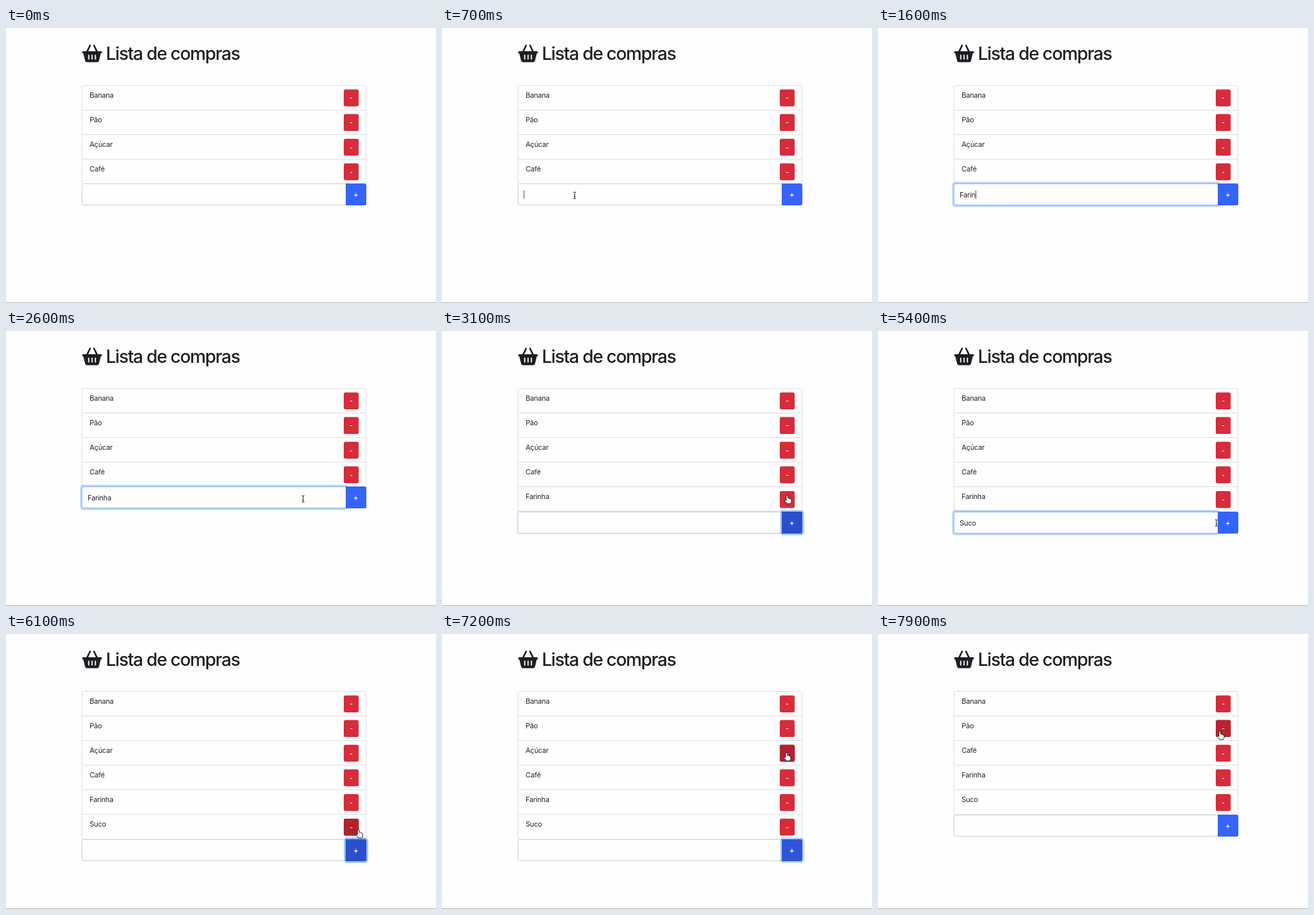
These frames come from a looping animation (648 by 414 pixels, 8 s). An HTML page:

```html
<!DOCTYPE html>
<html lang="pt">
<head>
<meta charset="utf-8">
<title>Lista de compras</title>
<style>
  html, body { margin: 0; width: 100%; height: 100%; overflow: hidden; background: #fefefe; }
  svg { display: block; width: 648px; height: 414px; }
  text { font: 10.6px Inter, "Liberation Sans", sans-serif; letter-spacing: -.2px; font-optical-sizing: none; fill: #222327; }
  .title { font-size: 27px; font-weight: 500; letter-spacing: -.045em; fill: #1d1e23; }
  .sign { fill: #fff; text-anchor: middle; letter-spacing: 0; font-size: 11px; }
  .plus { font-size: 12px; font-weight: 500; }
</style>
</head>
<body>
<svg viewBox="0 0 648 414">
  <rect width="648" height="414" fill="#fefefe"/>
  <g transform="translate(114.7 25) scale(.052)" stroke-linecap="round" stroke-linejoin="round" fill="none">
    <path d="M62 240H514L462 452Q454 482 424 482H152Q122 482 114 452Z" fill="#1d1e23" stroke="#1d1e23" stroke-width="60"/>
    <path d="M32 224H544" stroke="#1d1e23" stroke-width="64"/>
    <path d="M144 205L232 24M432 205L344 24" stroke="#1d1e23" stroke-width="48"/>
    <path d="M192 304V416M288 304V416M384 304V416" stroke="#fefefe" stroke-width="34"/>
  </g>
  <text class="title" x="150.5" y="48">Lista de compras</text>
  <path d="M0 413.5H648" stroke="#b4b4b4"/>
  <g id="page"></g>
  <text id="typed" x="123"></text>
  <path id="caret" stroke="#222327" stroke-width=".8"/>
  <g id="pointer"></g>
</svg>
<script>
const LOOP = 8000, STEP = 100, FADE = 150;
const LEFT = 114.5, RIGHT = 542.5, TOP = 86.5, ROW = 37.1, SPLIT = 512.5, INPUT_H = 32;
const $ = id => document.getElementById(id);

const rowTop = i => TOP + ROW * i;
const within = (t, spans) => spans.some(([a, b]) => t >= a && t < b);
const inBox = (p, x, y, w, h) => p.x >= x && p.x <= x + w && p.y >= y && p.y <= y + h;

const typing = [
  { blur: 2980, focus: 700, word: "Farinha", keys: [900, 1000, 1200, 1400, 1600, 1800, 1900], added: 3100 },
  { blur: 5520, focus: 3740, word: "Suco", keys: [4200, 4300, 4500, 4600], added: 5600 }
];
const plusFocus = [[2980, 3740], [5520, 7150]];
const pointerShown = [[100, 900], [2200, 4200], [4800, LOOP]];

// time, x, y of the pointer's hot spot
const path = [
  [100, 470, 140], [700, 200, 252], [2200, 230, 255], [2800, 524, 252], [3000, 525, 250],
  [3100, 520, 247], [3300, 519, 250], [3700, 202, 285], [4800, 202, 285], [5400, 510, 289],
  [5600, 526, 290], [5800, 524, 288], [6100, 531, 294], [6450, 531, 295], [7000, 519, 178],
  [7300, 519, 178], [7600, 518, 172], [7900, 515, 146]
];

function pointerAt(t) {
  const next = path.findIndex(k => k[0] > t);
  if (next <= 0) { const [, x, y] = path[next ? path.length - 1 : 0]; return { x, y }; }
  const a = path[next - 1], b = path[next];
  const u = (t - a[0]) / (b[0] - a[0]), e = u * u * (3 - 2 * u);
  return { x: a[1] + (b[1] - a[1]) * e, y: a[2] + (b[2] - a[2]) * e };
}

function itemsAt(t) {
  const items = ["Banana", "Pão", "Açúcar", "Café"];
  for (const entry of typing) if (t >= entry.added) items.push(entry.word);
  return t >= 7300 ? items.filter(name => name !== "Açúcar") : items;
}

// Share of the last FADE ms during which a state held: a linear transition.
function fade(t, test) {
  let held = 0;
  for (let s = 5; s < FADE; s += 10) if (test(t - s)) held++;
  return held / (FADE / 10);
}

const shown = t => within(t, pointerShown);
const overMinus = name => t => {
  const i = itemsAt(t).indexOf(name);
  return i >= 0 && shown(t) && inBox(pointerAt(t), 509, rowTop(i) + 6, 22.5, 25.5);
};
const overPlus = t => shown(t) && inBox(pointerAt(t), SPLIT, rowTop(itemsAt(t).length), 30.5, INPUT_H + 1);
const overInput = t => shown(t) && inBox(pointerAt(t), LEFT, rowTop(itemsAt(t).length), SPLIT - LEFT, INPUT_H + 1);
const inputFocused = t => typing.some(e => t >= e.focus && t < e.blur);
const plusFocused = t => within(t, plusFocus);

const rect = (x, y, w, h, attrs) => `<rect x="${x}" y="${y}" width="${w}" height="${h}" ${attrs}/>`;

function rows(t, items) {
  let out = rect(LEFT, TOP, RIGHT - LEFT, ROW * items.length, 'rx="2.7" fill="#fefefe" stroke="#dedee0"');
  items.forEach((name, i) => {
    const y = rowTop(i);
    if (i) out += `<path d="M${LEFT} ${Math.round(y) - .5}H${RIGHT}" stroke="#dedee0"/>`;
    out += `<text x="126" y="${y + 18}">${name}</text>`;
    out += rect(509, y + 6, 22.5, 25.5, 'rx="2.7" fill="#d72c3b"');
    out += rect(509, y + 6, 22.5, 25.5, `rx="2.7" fill="#b1222f" opacity="${fade(t, overMinus(name))}"`);
    out += `<text class="sign" x="520.3" y="${y + 22.8}">-</text>`;
  });
  return out;
}

function inputBox(y, focus) {
  const w = SPLIT - LEFT + .5;
  const shape = `M${SPLIT + .5} ${y}H${LEFT + 2.7}q-2.7 0 -2.7 2.7v${INPUT_H - 5.4}q0 2.7 2.7 2.7H${SPLIT + .5}z`;
  return rect(LEFT - 1.6, y - 1.6, w + 3.2, INPUT_H + 3.2,
      `rx="3.5" fill="none" stroke="#0d6efd" stroke-width="2.6" opacity="${.28 * focus}"`) +
    `<path d="${shape}" fill="#fefefe" stroke="#ced2d8"/>` +
    `<path d="${shape}" fill="none" stroke="#86b3f8" opacity="${focus}"/>`;
}

function plusButton(y, focus, dark) {
  const x = SPLIT - .5, t = y - .5;
  const shape = `M${x} ${t}h28.3q2.7 0 2.7 2.7v${INPUT_H - 4.4}q0 2.7 -2.7 2.7h-28.3z`;
  return rect(x - 1.3, t - 1.3, 33.6, INPUT_H + 3.6,
      `rx="3.5" fill="none" stroke="#3184fd" stroke-width="2.6" opacity="${.52 * focus}"`) +
    `<path d="${shape}" fill="#3563fb"/><path d="${shape}" fill="#2b4fca" opacity="${dark}"/>` +
    `<text class="sign plus" x="527.3" y="${y + 20.8}">+</text>`;
}

function typedText(t, y) {
  const entry = typing.find(e => t >= e.focus && t < e.added);
  const pressed = entry ? entry.keys.filter(k => k <= t) : [];
  const label = $("typed"), caret = $("caret");
  label.textContent = entry ? entry.word.slice(0, pressed.length) : "";
  label.setAttribute("y", y + 20.2);
  const since = entry ? t - (pressed.length ? pressed[pressed.length - 1] : entry.focus) : 0;
  const visible = inputFocused(t) && since % 1000 < 500;
  const x = 123 + (pressed.length ? label.getComputedTextLength() : 0) + .6;
  caret.setAttribute("d", visible ? `M${x} ${y + 10}v12.5` : "");
}

const cursors = {
  hand: '<path d="M-1.2 1Q0 -.8 1.2 1V4.6Q2.6 4 3.2 5.2Q4.6 4.7 5 6Q6.6 5.7 6.6 7.4V9.4Q6.4 11.4 5.4 13H-.2Q-1.4 10.8 -3.2 9Q-4.4 7.4 -3 7Q-2 7 -1.2 8.2Z" fill="#fff" stroke="#111" stroke-width=".9" stroke-linejoin="round"/>',
  beam: '<path d="M-2 -5Q0 -5 0 -3.8Q0 -5 2 -5M0 -3.8V3.8M-2 5Q0 5 0 3.8Q0 5 2 5M-1 1.6H1" fill="none" stroke="#222" stroke-width="1"/>',
  arrow: '<path d="M0 0V11.2L2.6 8.8L4.3 12.6L6 11.8L4.3 8.1H7.8Z" fill="#111" stroke="#fff" stroke-width=".8"/>'
};

function pointer(t, items) {
  if (!shown(t)) return "";
  const { x, y } = pointerAt(t);
  const onButton = overPlus(t) || items.some(name => overMinus(name)(t));
  const kind = onButton ? "hand" : overInput(t) ? "beam" : "arrow";
  return `<g transform="translate(${x} ${y})">${cursors[kind]}</g>`;
}

function draw(t) {
  const items = itemsAt(t);
  const y = Math.floor(rowTop(items.length)) + .5;
  const plusRing = fade(t, plusFocused);
  const dark = fade(t, u => plusFocused(u) || overPlus(u));
  const layers = [inputBox(y, fade(t, inputFocused)), plusButton(y, plusRing, dark)];
  $("page").innerHTML = rows(t, items) + layers.join("");
  typedText(t, y);
  $("pointer").innerHTML = pointer(t, items);
}

let last = -1;
const start = performance.now();
function tick() {
  const t = Math.floor(((performance.now() - start) % LOOP) / STEP) * STEP;
  if (t !== last) draw(last = t);
  requestAnimationFrame(tick);
}
tick();
</script>
</body>
</html>
```
